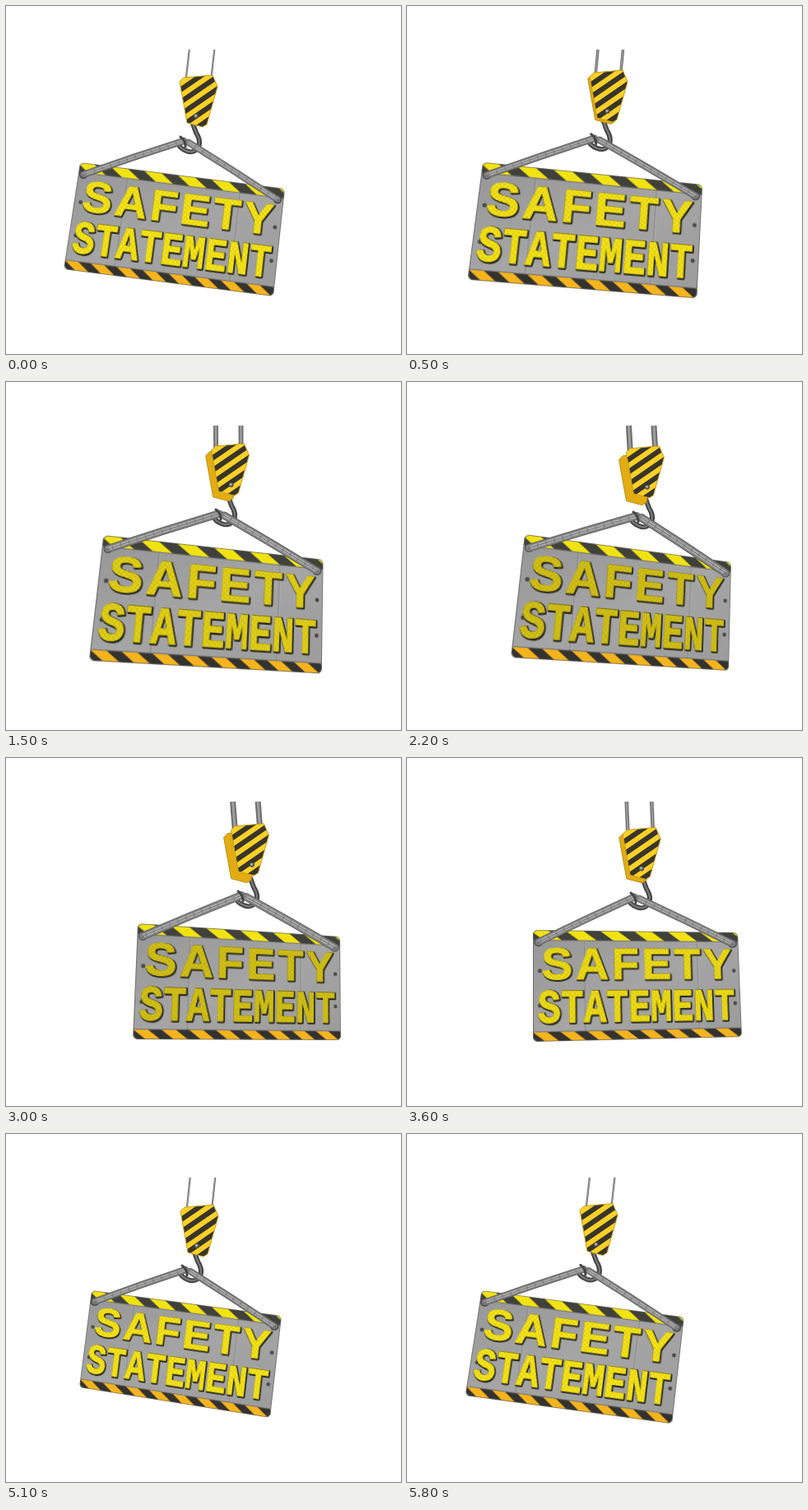
Recreate the animation shown at these times as an HTML page. Size 480 by 423 pixels, loop 5.9 s.

```html
<!DOCTYPE html>
<html lang="en">
<head>
<meta charset="utf-8">
<title>Safety statement</title>
<style>
html, body { margin: 0; width: 100%; height: 100%; overflow: hidden; background: #fff; }
svg { position: absolute; left: 0; top: 0; overflow: visible; }
#board { transform-origin: 0 0; }
text { text-anchor: middle; font-weight: bold; font-kerning: none; }
.wide { font-size: 54px; font-family: "Liberation Sans", Arial, sans-serif; letter-spacing: 3.5px; }
.tall { font-size: 44px; font-family: "Liberation Mono", monospace; }
.edge { fill: #2b2a20; stroke: #2b2a20; stroke-width: 2.8; stroke-linejoin: round; }
.face { fill: url(#tread); stroke: url(#tread); stroke-width: .9; }
#rig path { fill: none; stroke-linecap: round; stroke-linejoin: round; }
#rig .butt { stroke-linecap: butt; }
</style>
</head>
<body>
<svg id="board" width="250" height="132">
  <defs>
    <linearGradient id="steel" x2="1" y2="1">
      <stop stop-color="#969696"/><stop offset=".5" stop-color="#a5a5a5"/><stop offset="1" stop-color="#9b9b9b"/>
    </linearGradient>
    <pattern id="tread" width="4" height="4" patternUnits="userSpaceOnUse" patternTransform="rotate(40)">
      <rect id="paint" width="4" height="4"/>
      <path d="M0 .5H4M.5 0V4" stroke="#7d7000" stroke-opacity=".16"/>
    </pattern>
    <pattern id="lemon" x="35" width="41" height="12" patternUnits="userSpaceOnUse">
      <rect width="41" height="12" fill="#41413c"/><path d="M2 0H23L39 12H18Z" fill="#f1e310"/>
    </pattern>
    <pattern id="amber" y="121" width="31" height="11" patternUnits="userSpaceOnUse">
      <rect width="31" height="11" fill="#34322e"/><path d="M0 0H16L30 11H14Z" fill="#f6b41c"/>
    </pattern>
    <clipPath id="plate"><rect width="250" height="132" rx="6"/></clipPath>
  </defs>
  <g clip-path="url(#plate)">
    <rect width="250" height="132" fill="url(#steel)"/>
    <path d="M60 12V121M197 12V121" stroke="#7d7d7d"/>
    <path d="M61 12V121M198 12V121" stroke="#b5b5b5" stroke-width=".7"/>
    <rect width="250" height="12" fill="url(#lemon)"/>
    <rect y="121" width="250" height="11" fill="url(#amber)"/>
    <path d="M0 12.3H250M0 120.7H250" stroke="#707070"/>
    <rect width="250" height="132" rx="6" fill="none" stroke="#6a6a6a" stroke-width="1.6"/>
  </g>
  <g id="bolts" fill="#4a4a4a"></g>
  <g id="words"></g>
</svg>
<svg id="rig" width="480" height="423"></svg>
<script>
const LOOP = 5900, W = 250, H = 132;
const $ = id => document.getElementById(id);

// time, four board corners clockwise, block centre, knot, block depth
const keys = [
  [0, 90, 190, 339, 222, 325, 353, 70, 320, 235, 116, 219, 167, 0],
  [900, 99, 189, 375, 214, 373, 356, 82, 340, 256, 108, 243, 162, 4],
  [2200, 143, 185, 394, 219, 391, 351, 126, 335, 288, 113, 282, 166, 8],
  [3000, 160, 201, 406, 217, 407, 343, 154, 342, 295, 115, 289, 170, 8],
  [3600, 153, 209, 402, 212, 407, 339, 153, 345, 285, 118, 279, 172, 4],
  [4200, 134, 211, 377, 204, 381, 330, 140, 335, 257, 119, 252, 173, 0],
  [5100, 104, 190, 335, 221, 321, 345, 89, 308, 236, 118, 221, 168, 0]
];

const word = (text, cls, x, y, stretch) => ["edge", "face"].map((c, i) =>
  `<text class="${cls} ${c}" transform="translate(${x - i * .9} ${y - i * .9}) scale(1 ${stretch})">${text}</text>`).join("");
$("words").innerHTML = word("SAFETY", "wide", 127.5, 60, 1) + word("STATEMENT", "tall", 125, 111, 1.28);
$("bolts").innerHTML = [8, 243].map(x => [49, 90].map(y => `<circle cx="${x}" cy="${y}" r="2.4"/>`).join("")).join("");

function keyAt(i) {
  const lap = Math.floor(i / keys.length);
  return keys[i - lap * keys.length].map((v, c) => c ? v : v + lap * LOOP);
}

// Smooth closed curve through the keys
function pose(t) {
  const i = keys.filter(k => k[0] <= t).length - 1;
  const [p, a, b, n] = [-1, 0, 1, 2].map(d => keyAt(i + d));
  const h = b[0] - a[0], s = (t - a[0]) / h, s2 = s * s, s3 = s2 * s;
  return a.map((v, c) => {
    const m0 = (b[c] - p[c]) / (b[0] - p[0]) * h, m1 = (n[c] - v) / (n[0] - a[0]) * h;
    return (2 * s3 - 3 * s2 + 1) * v + (s3 - 2 * s2 + s) * m0 + (3 * s2 - 2 * s3) * b[c] + (s3 - s2) * m1;
  });
}

// Projection of the unit square onto the board corners
function project([x0, y0, x1, y1, x2, y2, x3, y3]) {
  const ax = x1 - x2, ay = y1 - y2, bx = x3 - x2, by = y3 - y2;
  const sx = x0 - x1 + x2 - x3, sy = y0 - y1 + y2 - y3, det = ax * by - bx * ay;
  const g = (sx * by - bx * sy) / det, h = (ax * sy - sx * ay) / det;
  const a = x1 - x0 + g * x1, b = x3 - x0 + h * x3;
  const d = y1 - y0 + g * y1, e = y3 - y0 + h * y3;
  return {
    css: `matrix3d(${[a / W, d / W, 0, g / W, b / H, e / H, 0, h / H, 0, 0, 1, 0, x0, y0, 0, 1].map(v => v.toFixed(8))})`,
    at: (u, v) => [(a * u + b * v + x0) / (g * u + h * v + 1), (d * u + e * v + y0) / (g * u + h * v + 1)]
  };
}

const line = (d, color, width, more = "") => `<path d="${d}" stroke="${color}" stroke-width="${width}" ${more}/>`;

function rope([x, y], kx, ky, width) {
  const d = `M${kx} ${ky}Q${(x + kx) / 2} ${(y + ky) / 2 - 1} ${x} ${y}`;
  return `<circle cx="${x}" cy="${y}" r="5.4" fill="#4b4b4b"/>` +
    line(d, "#606060", width) + line(d, "#858585", width - 2) +
    line(d, "#b4b4b4", width * .4, 'class="butt" stroke-dasharray="9 1.5"') +
    line(d, "#777", width * .12) +
    `<circle cx="${x}" cy="${y + 1}" r="2" fill="#777"/>`;
}

function hook(x, y) {
  const d = `M${x + 8} ${y - 24}L${x + 12} ${y - 13}C${x + 22} ${y + 3} ${x + 11} ${y + 14} ${x} ${y + 9}Q${x - 8} ${y + 6} ${x - 9} ${y + 1}`;
  return line(d, "#454545", 6) + line(d, "#7c7c7c", 2);
}

const shell = "-24,-24 -19,-29 16,-32 22,-18 9,28 4,31 -15,26";
const hazard = [-18, -3, 12, 27, 42].map(y => line(`M-32 ${y + 10}L32 ${y - 34}`, "#38352a", 6.2)).join("");

function block(x, y, depth) {
  const side = depth > .5 ? `<polygon points="${shell}" transform="translate(${-depth * .8} ${depth * .7})" fill="#e3ac10" stroke="#b98d14"/>` : "";
  return `<g transform="translate(${x} ${y})">${side}
    <g transform="translate(${depth * .3} ${-depth * .4})">
      <clipPath id="shell"><polygon points="${shell}"/></clipPath>
      <g clip-path="url(#shell)"><rect x="-30" y="-40" width="60" height="80" fill="#fbd026"/>${hazard}</g>
      <polygon points="${shell}" fill="none" stroke="#c79d20" stroke-linejoin="round"/>
      <circle cx="${-4 + depth * .7}" cy="18" r="3" fill="#555"/><circle cx="${-4.5 + depth * .7}" cy="17.5" r="1.4" fill="#bbb"/>
    </g></g>`;
}

function cables(x, y, width) {
  const top = x * .88 + 16;
  return [0, 30.5].map(dx => {
    const d = `M${top + dx} 53L${x - 16.5 + dx} ${y - 25}`;
    return line(d, "#6c6c6c", width, 'class="butt"') + line(d, "#9c9c9c", width * .45, 'class="butt"');
  }).join("");
}

function draw() {
  const t = Math.floor(performance.now() % LOOP / 100) * 100;
  const p = pose(t), [bx, by, kx, ky, d] = p.slice(9), depth = Math.max(0, d);
  const view = project(p.slice(1, 9)), dim = depth * depth * .6, width = 8.2 + depth * .2;
  $("board").style.transform = view.css;
  $("paint").setAttribute("fill", `rgb(${248 - dim},${230 - dim},22)`);
  $("rig").innerHTML = cables(bx, by, 2.2 + depth * .6) + hook(kx, ky) +
    rope(view.at(.025, .11), kx - 3, ky - 3, width) + rope(view.at(.97, .11), kx + 3, ky - 1, width) +
    line(`M${kx - 7} ${ky - 8}Q${kx - 1} ${ky - 4} ${kx - 1} ${ky + 4}`, "#444", 3) +
    block(bx, by, depth);
  requestAnimationFrame(draw);
}
draw();
</script>
</body>
</html>
```
